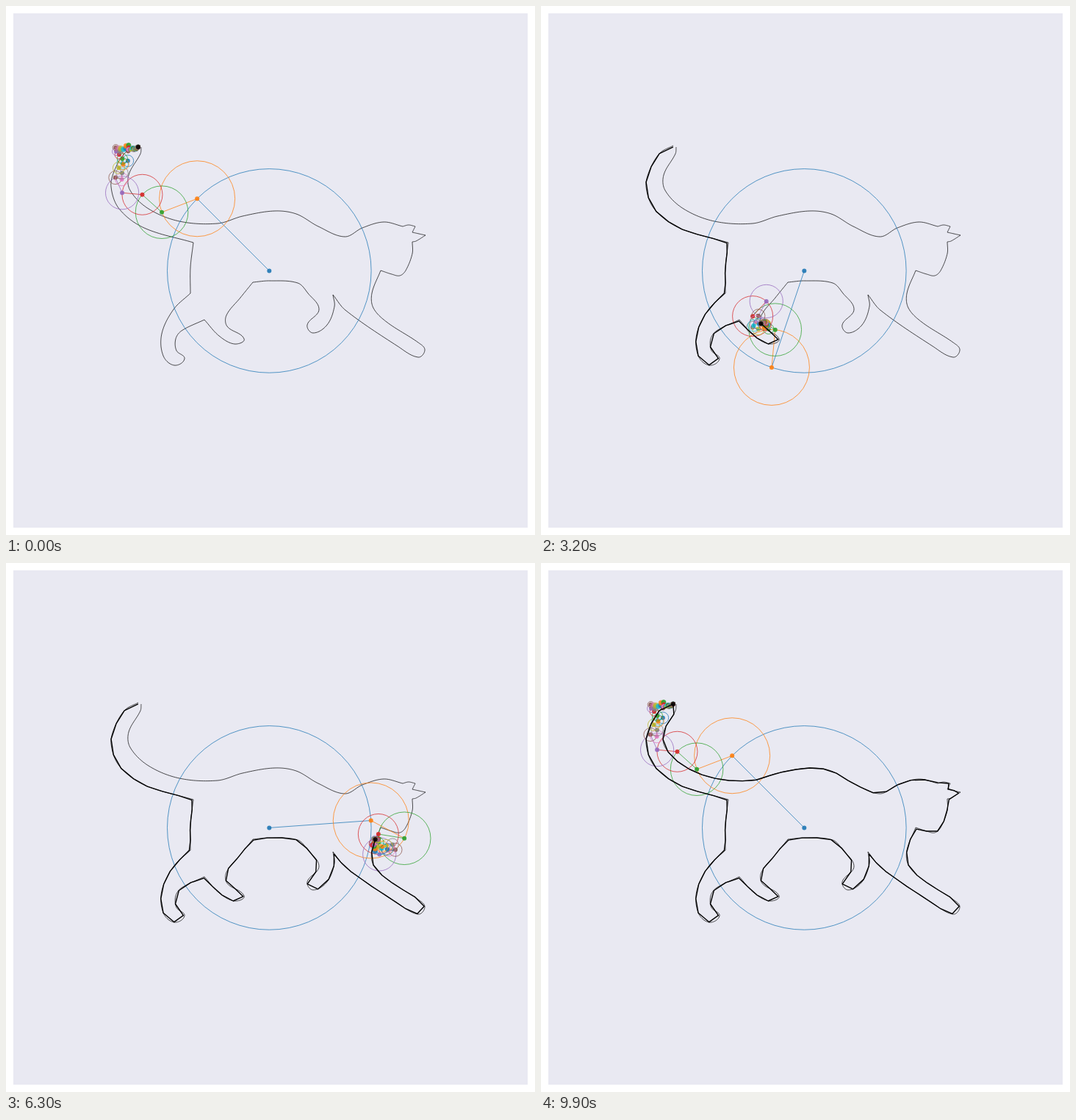
An HTML page for the animation above (10 s loop, 720 px wide and 720 px high).

```html
<!DOCTYPE html>
<html lang="en">
<head>
<meta charset="utf-8">
<title>Epicycle cat</title>
<style>
  html, body { margin: 0; width: 100%; height: 100%; overflow: hidden; background: #fff; }
  svg { display: block; width: 100vw; height: 100vh; }
</style>
</head>
<body>
<svg id="stage" viewBox="0 0 720 720" fill="none">
  <rect x="10" y="10" width="700" height="700" fill="#e9e9f2"/>
  <path id="outline" stroke="#000" stroke-width=".7"/>
  <g id="chain"></g>
  <path id="trace" stroke="#000" stroke-width="1.4" stroke-linejoin="round"/>
  <circle id="pen" r="3" fill="#000" fill-opacity=".85"/>
</svg>
<script>
const TAU = 2 * Math.PI;
const STEPS = 99;          // pen steps in one full turn
const STEP_MS = 100;
const ORDER = 50;          // highest frequency used
const CENTER = [358.3, 360.4];
const COLORS = ['#1f77b4', '#ff7f0e', '#2ca02c', '#d62728', '#9467bd',
                '#8c564b', '#e377c2', '#7f7f7f', '#bcbd22', '#17becf'];

// Smooth strokes between sharp corners: [step at which the pen arrives, points].
const START = [180, 190];
const STROKES = [
  [10, '162 200 148 223 143 246 154 276 188 302 255 322'],
  [15, '251 356 251 391'],
  [26, '228 413 212 446 214 476 229 489 243 480 232 469 231 453 239 442 270 427'],
  [36, '290 449 311 460 324 453 301 436 300 421 319 397 336 376'],
  [47, '359 374 397 377 411 391 426 413 410 434 418 445 437 434 447 409 445 393'],
  [64, '462 414 533 463 561 478 570 468 561 458 518 430 500 411 498 391 510 360'],
  [69, '525 365 536 367 544 360 553 337 553 321'],
  [70, '558 320 571 312'],
  [72, '553 308'],
  [73, '557 300'],
  [74, '548 298 540 300'],
  [98.8, '514 294 485 302 461 314 425 300 395 283 365 279 322 286 288 296 ' +
         '236 293 194 276 169 251 167 230 183 201 184 192'],
  [STEPS, START.join(' ')]
];

// Dominant circles: frequency, radius, start angle in degrees.
const LEADS = [[1, 138.8, 135], [-1, 51.5, 201], [-3, 35.8, 138], [2, 27.5, 174.7], [-2, 22.6, 114]]
  .map(([freq, radius, deg]) => ({ freq, radius, phase: deg * TAU / 360 }));

const dist = (a, b) => Math.hypot(b[0] - a[0], b[1] - a[1]);
const lerp = (a, b, u) => a + (b - a) * u;
const toPath = points => 'M' + points.map(p => p[0].toFixed(2) + ' ' + p[1].toFixed(2)).join('L');

// Curve through all points, with handles along the neighbours' direction.
function smooth(points) {
  const tangents = points.map((p, i) => {
    const a = points[Math.max(i - 1, 0)], b = points[Math.min(i + 1, points.length - 1)];
    const d = dist(a, b) || 1;
    return [(b[0] - a[0]) / d, (b[1] - a[1]) / d];
  });
  const out = [points[0]];
  for (let i = 0; i + 1 < points.length; i++) {
    const a = points[i], b = points[i + 1], h = dist(a, b) / 3;
    for (let n = 1; n <= 16; n++) {
      const u = n / 16, v = 1 - u;
      out.push([0, 1].map(k =>
        v * v * v * a[k] + 3 * v * v * u * (a[k] + h * tangents[i][k]) +
        3 * v * u * u * (b[k] - h * tangents[i + 1][k]) + u * u * u * b[k]));
    }
  }
  return out;
}

// Contour as [x, y, step] points; the speed is constant within a stroke.
function buildContour() {
  const contour = [[...START, 0]];
  let last = START, begin = 0, open = 0;
  for (const [end, text] of STROKES) {
    const nums = text.split(' ').map(Number);
    const points = [last];
    for (let i = 0; i < nums.length; i += 2) points.push([nums[i], nums[i + 1]]);
    const curve = smooth(points);
    const lengths = [0];
    for (let i = 1; i < curve.length; i++) lengths.push(lengths[i - 1] + dist(curve[i - 1], curve[i]));
    const total = lengths[lengths.length - 1];
    open = contour.length;
    for (let i = 1; i < curve.length; i++) {
      contour.push([...curve[i], lerp(begin, end, lengths[i] / total)]);
    }
    last = points[points.length - 1];
    begin = end;
  }
  return { contour, outline: contour.slice(0, open) };
}

function resample(contour, count) {
  let i = 0;
  return Array.from({ length: count }, (_, j) => {
    const step = j / count * STEPS;
    while (contour[i + 1][2] <= step) i++;
    const a = contour[i], b = contour[i + 1];
    const u = (step - a[2]) / (b[2] - a[2]);
    return [lerp(a[0], b[0], u), lerp(a[1], b[1], u)];
  });
}

// Joints of a chain of circles at a turn from 0 to 1.
function joints(circles, turn) {
  let [x, y] = CENTER;
  const out = [[x, y]];
  for (const c of circles) {
    const angle = c.phase + c.freq * turn * TAU;
    x += c.radius * Math.cos(angle);
    y -= c.radius * Math.sin(angle);
    out.push([x, y]);
  }
  return out;
}

// Fourier terms of whatever the dominant circles leave over, largest first.
function remainder(samples) {
  const count = samples.length;
  const rest = samples.map(([x, y], j) => {
    const [px, py] = joints(LEADS, j / count).pop();
    return [x - px, py - y];
  });
  const circles = [];
  for (let freq = -ORDER; freq <= ORDER; freq++) {
    let re = 0, im = 0;
    rest.forEach(([x, y], j) => {
      const c = Math.cos(freq * j / count * TAU), s = Math.sin(freq * j / count * TAU);
      re += x * c + y * s;
      im += y * c - x * s;
    });
    circles.push({ freq, radius: Math.hypot(re, im) / count, phase: Math.atan2(im, re) });
  }
  return circles.sort((a, b) => b.radius - a.radius);
}

const $ = id => document.getElementById(id);
const set = (el, attrs) => { for (const key in attrs) el.setAttribute(key, attrs[key]); };
function add(tag, attrs) {
  const el = document.createElementNS('http://www.w3.org/2000/svg', tag);
  set(el, attrs);
  return $('chain').appendChild(el);
}

const { contour, outline } = buildContour();
const circles = [...LEADS, ...remainder(resample(contour, STEPS * 8))];
const poses = Array.from({ length: STEPS + 1 }, (_, i) => joints(circles, i / STEPS));
const tips = poses.map(pose => pose[pose.length - 1]);

const parts = circles.map((c, i) => {
  const color = COLORS[i % COLORS.length];
  const stroke = { stroke: color, 'stroke-width': .75 };
  const dot = { r: 3, fill: color, 'fill-opacity': .9 };
  return {
    ring: add('circle', { r: c.radius, ...stroke }),
    arm: add('line', stroke),
    dot: add('circle', dot)
  };
});
set($('outline'), { d: toPath(outline) });

let shown = -1;
function draw(step) {
  if (step === shown) return;
  shown = step;
  const pose = poses[step];
  parts.forEach(({ ring, arm, dot }, i) => {
    const [x, y] = pose[i], [x2, y2] = pose[i + 1];
    set(ring, { cx: x, cy: y });
    set(arm, { x1: x, y1: y, x2, y2 });
    set(dot, { cx: x, cy: y });
  });
  set($('trace'), { d: toPath(tips.slice(0, step + 1)) });
  set($('pen'), { cx: tips[step][0], cy: tips[step][1] });
}

const t0 = performance.now();
function tick() {
  draw(Math.floor((performance.now() - t0) / STEP_MS) % (STEPS + 1));
  requestAnimationFrame(tick);
}
tick();
</script>
</body>
</html>
```
